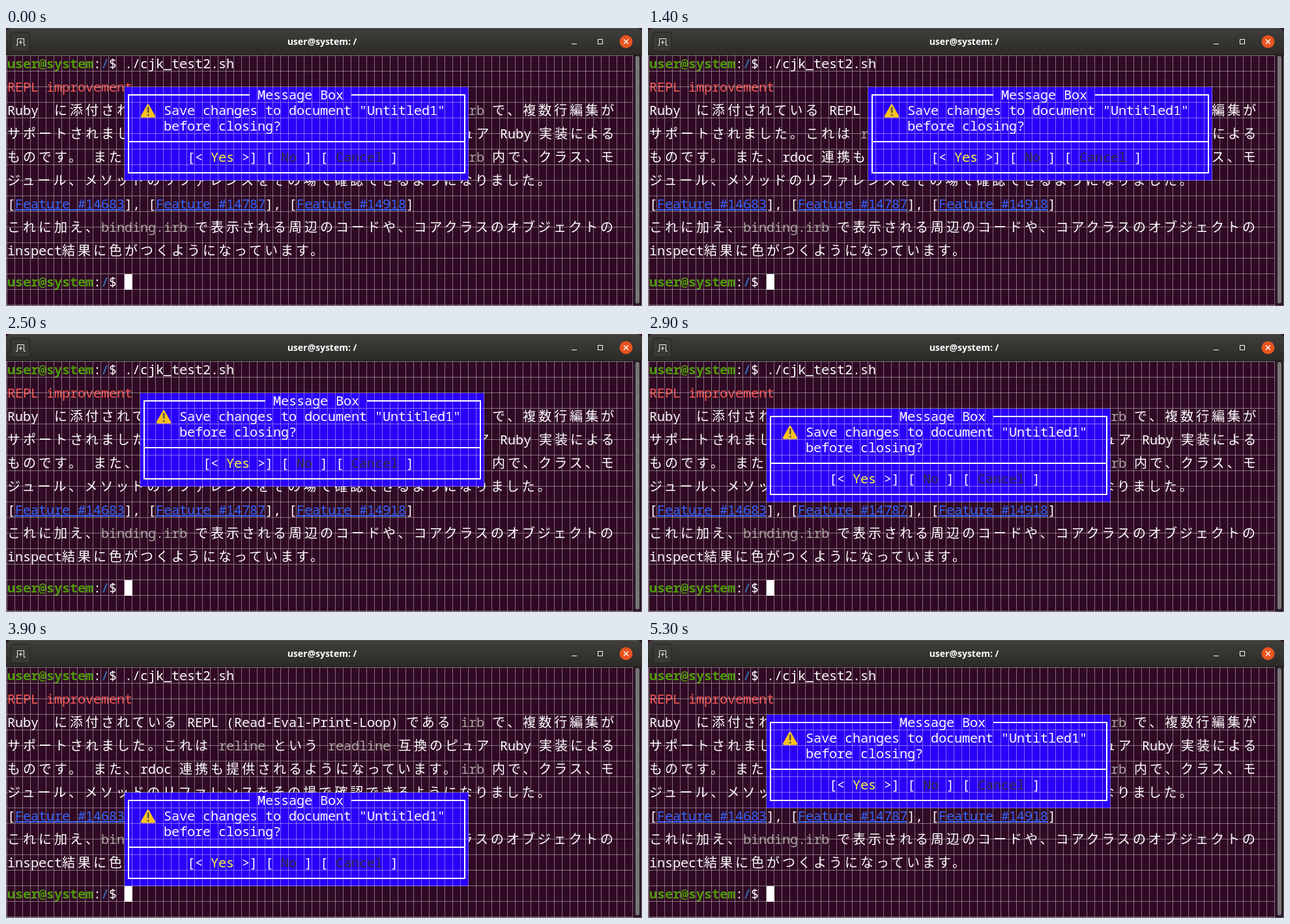
Recreate the animation shown at these times as an HTML page. Size 976 by 428 pixels, loop 5500 ms.

```html
<!DOCTYPE html>
<html lang="ja">
<head>
<meta charset="utf-8">
<title>Terminal</title>
<style>
html, body { margin: 0; width: 100%; height: 100%; overflow: hidden; background: #300a24; }
svg { display: block; width: 976px; height: 428px; }
text { white-space: pre; }
.term { font: 20px "Noto Sans Mono", "Noto Sans CJK JP", monospace; fill: #fff; }
.wide { font-family: "Noto Sans CJK JP", "Noto Sans CJK", sans-serif; letter-spacing: 4px; }
.bold { font-weight: bold; }
.link { text-decoration: underline; }
</style>
</head>
<body>
<svg id="stage" viewBox="0 0 976 428">
  <defs>
    <linearGradient id="bar" x2="0" y2="1">
      <stop offset="0" stop-color="#403f3c"/>
      <stop offset="1" stop-color="#2b2a27"/>
    </linearGradient>
  </defs>
  <rect width="976" height="428" fill="#300a24"/>
  <g id="screen" class="term"></g>
  <g id="box" class="term">
    <rect width="528" height="144" fill="#2a00f8"/>
    <path d="M192 12H6V132H522V12H348M6 84H522" fill="none" stroke="#fff" stroke-width="2"/>
    <path d="M36 28L45.5 45H26.5Z" fill="#fcc21b" stroke="#fcc21b" stroke-width="3.4" stroke-linejoin="round"/>
    <path d="M36 31.5V38.5" stroke="#2f2f2f" stroke-width="2.6" stroke-linecap="round"/>
    <circle cx="36" cy="43" r="1.6" fill="#2f2f2f"/>
  </g>
  <path id="grid" fill="none" stroke="#fff" stroke-opacity=".4"/>
  <rect x="963" y="42" width="13" height="386" fill="#2c1727"/>
  <rect x="966" y="43" width="6" height="381" rx="3" fill="#777"/>
  <path d="M0.5 42V428M975.5 42V428M0 427.5H976" stroke="#69625f"/>
  <path d="M0 42V8Q0 0 8 0H968Q976 0 976 8V42Z" fill="url(#bar)"/>
  <path d="M0 41.5H976" stroke="#1b1a18"/>
  <path d="M7 0.5H969" stroke="#5a5955"/>
  <rect x="7.5" y="6.5" width="29" height="29" rx="4" fill="#393835" stroke="#22211f"/>
  <path d="M15 26.5H17.5V16.5H27.5V26.5H30M22.5 19V25M19.5 22H25.5" fill="none" stroke="#f4f4f2"/>
  <text x="485" y="26" text-anchor="middle" fill="#fff" style="font:bold 14px 'Noto Sans','Open Sans',sans-serif">user@system: /</text>
  <path d="M868 24.5H876M908.5 17.5H915.5V24.5H908.5Z" fill="none" stroke="#fff"/>
  <circle cx="951.5" cy="21" r="10" fill="#e95420"/>
  <path d="M948 17.5L955 24.5M955 17.5L948 24.5" stroke="#fff" stroke-width="1.4"/>
</svg>
<script>
const NS = "http://www.w3.org/2000/svg";
const COL = 12, ROW = 24, LEFT = 2, TOP = 43;
const LOOP = 5500, TURN = 2700;
const GREEN = "#4e9a06", BLUE = "#3465a4", RED = "#f65a55";
const LINK = "#3465ff", GRAY = "#aaa69f", DARK = "#2e3436", YELLOW = "#ffff3c";
const $ = id => document.getElementById(id);
const screen = $("screen"), box = $("box");

// Each span is plain text or [text, colour, class]; wide glyphs fill two columns.
function write(parent, x, y, ...spans) {
  for (const span of spans) {
    const [str, color = "", cls = ""] = [].concat(span);
    for (const run of str.match(/[\u3000-\u9fff]+|[^\u3000-\u9fff]+/g)) {
      const wide = run.charCodeAt(0) >= 0x3000;
      const el = document.createElementNS(NS, "text");
      el.setAttribute("x", x);
      el.setAttribute("y", y);
      el.setAttribute("class", cls + (wide ? " wide" : ""));
      if (color) el.style.fill = color;
      el.textContent = run;
      parent.append(el);
      x += run.length * COL * (wide ? 2 : 1);
    }
  }
}

const code = str => [str, GRAY];
const link = id => ["Feature #" + id, LINK, "link"];
const prompt = [["user@system", GREEN, "bold"], ":", ["/", BLUE, "bold"], "$ "];

const article = [
  [["REPL improvement", RED]],
  ["Ruby\u3000に添付されている REPL (Read-Eval-Print-Loop) である ", code("irb"), " で、複数行編集が"],
  ["サポートされました。これは ", code("reline"), " という ", code("readline"), " 互換のピュア Ruby 実装による"],
  ["ものです。 また、rdoc 連携も提供されるようになっています。", code("irb"), " 内で、クラス、モ"],
  ["ジュール、メソッドのリファレンスをその場で確認できるようになりました。"],
  ["[", link(14683), "], [", link(14787), "], [", link(14918), "]"],
  ["これに加え、", code("binding.irb"), " で表示される周辺のコードや、コアクラスのオブジェクトの"],
  ["inspect結果に色がつくようになっています。"]
];

write(screen, LEFT, 62, ...prompt, "./cjk_test2.sh");
article.forEach((line, i) => write(screen, LEFT, 98 + i * 36, ...line));
write(screen, LEFT, 398, ...prompt);

const cursor = document.createElementNS(NS, "rect");
for (const [k, v] of Object.entries({ x: 182, y: 379, width: COL, height: ROW, fill: "#fff" }))
  cursor.setAttribute(k, v);
screen.append(cursor);

write(box, 17 * COL, 19, "Message Box");
write(box, 5 * COL, 43, 'Save changes to document "Untitled1"');
write(box, 5 * COL, 67, "before closing?");
write(box, 8 * COL, 115, "[< ", ["Yes", YELLOW], " >] [ ", ["No", DARK], " ] [ ", ["Cancel", DARK], " ]");

let lines = "";
for (let i = 0; i <= 80; i++) lines += `M${LEFT + i * COL - .5} 42V427`;
for (let i = 0; i <= 16; i++) lines += `M1 ${TOP + i * ROW - .5}H962`;
$("grid").setAttribute("d", lines);

// Out and back in whole cells, turning after `peak` steps.
const bounce = (step, peak) => Math.max(0, peak - Math.abs(step - peak));

function draw(t) {
  const dx = bounce(Math.floor(t / 100) - 1, 13);
  const dy = bounce(Math.floor((t - TURN) / 200), 7);
  box.setAttribute("transform", `translate(${182 + dx * COL} ${91 + dy * ROW})`);
}

const start = performance.now();
function tick() {
  draw((performance.now() - start) % LOOP);
  requestAnimationFrame(tick);
}
draw(0);
requestAnimationFrame(tick);
</script>
</body>
</html>
```
